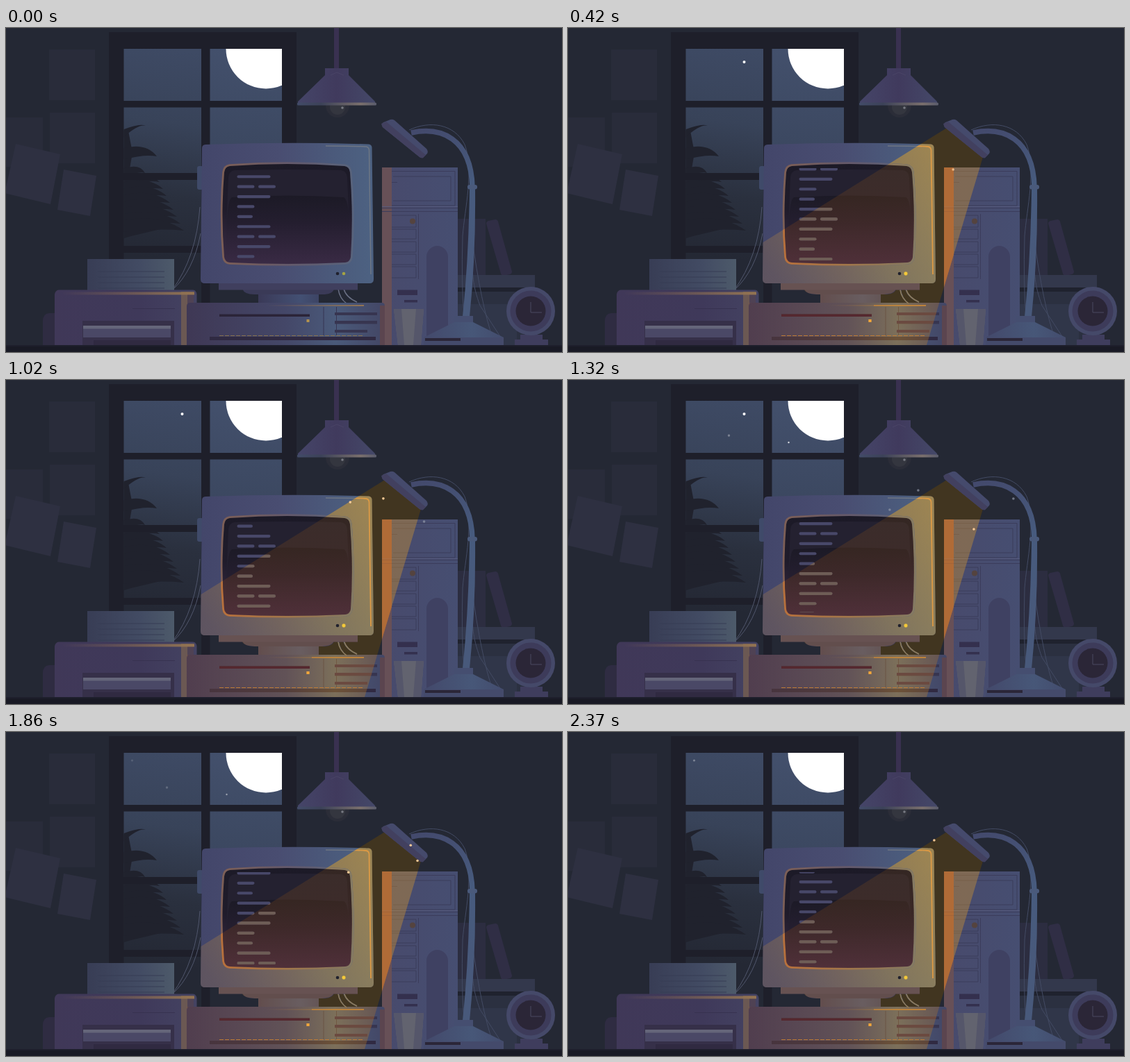
Write an HTML page that moves like this. It is 800 px wide and 467 px high and loops after 2.4 s.

```html
<!DOCTYPE html>
<html lang="en">
<head>
<meta charset="utf-8">
<title>Night desk</title>
<style>
html, body { margin: 0; width: 100%; height: 100%; overflow: hidden; background: #242834; }
svg { display: block; width: 100%; height: 100%; }
</style>
</head>
<body>
<svg viewBox="0 0 800 467" xmlns="http://www.w3.org/2000/svg">
<defs>
  <linearGradient id="sky" gradientUnits="userSpaceOnUse" x1="240" y1="30" x2="200" y2="330"><stop stop-color="#3e4a64"/><stop offset=".35" stop-color="#384359"/><stop offset=".7" stop-color="#2a303e"/><stop offset="1" stop-color="#242834"/></linearGradient>
  <linearGradient id="skyR" gradientUnits="userSpaceOnUse" x1="340" y1="30" x2="320" y2="200"><stop stop-color="#43506c"/><stop offset="1" stop-color="#3a465e"/></linearGradient>
  <linearGradient id="shade"><stop stop-color="#454568"/><stop offset=".5" stop-color="#403a5d"/><stop offset="1" stop-color="#444868"/></linearGradient>
  <linearGradient id="rim"><stop stop-color="#424b68"/><stop offset=".3" stop-color="#3c4258"/><stop offset=".8" stop-color="#7b706d"/><stop offset="1" stop-color="#5a5c6c"/></linearGradient>
  <linearGradient id="case"><stop stop-color="#43466a"/><stop offset=".45" stop-color="#494d71"/><stop offset=".8" stop-color="#4b5b7c"/><stop offset="1" stop-color="#4d6282"/></linearGradient>
  <linearGradient id="bezel"><stop stop-color="#7d5f56"/><stop offset=".5" stop-color="#64596a"/><stop offset="1" stop-color="#58637c"/></linearGradient>
  <linearGradient id="litBezel"><stop stop-color="#b8713c"/><stop offset=".5" stop-color="#a0764a"/><stop offset="1" stop-color="#857a62"/></linearGradient>
  <linearGradient id="glass" x2="0" y2="1"><stop stop-color="#1c1a27"/><stop offset=".45" stop-color="#1f1b2a"/><stop offset="1" stop-color="#3a2b45"/></linearGradient>
  <linearGradient id="glare" x2="0" y2="1"><stop stop-color="#1c1a26"/><stop offset=".4" stop-color="#241e2f"/><stop offset="1" stop-color="#392a44"/></linearGradient>
  <linearGradient id="litGlass" x2="0" y2="1"><stop stop-color="#a06010" stop-opacity=".18"/><stop offset="1" stop-color="#904018" stop-opacity=".25"/></linearGradient>
  <linearGradient id="unit"><stop stop-color="#3f3855"/><stop offset=".5" stop-color="#444768"/><stop offset=".75" stop-color="#4a5a7a"/><stop offset="1" stop-color="#434665"/></linearGradient>
  <linearGradient id="neck"><stop stop-color="#3a3957"/><stop offset=".7" stop-color="#435073"/><stop offset="1" stop-color="#3d4464"/></linearGradient>
  <linearGradient id="print"><stop stop-color="#403858"/><stop offset=".6" stop-color="#3f395a"/><stop offset="1" stop-color="#444362"/></linearGradient>
  <linearGradient id="paper"><stop stop-color="#383d55"/><stop offset=".6" stop-color="#424b63"/><stop offset="1" stop-color="#4d5a6a"/></linearGradient>
  <linearGradient id="gold"><stop stop-color="#8a6a52" stop-opacity="0"/><stop offset="1" stop-color="#937452"/></linearGradient>
  <linearGradient id="tower"><stop stop-color="#484a6c"/><stop offset="1" stop-color="#464e71"/></linearGradient>
  <linearGradient id="pole" gradientUnits="userSpaceOnUse" x1="600" y1="140" x2="680" y2="330"><stop stop-color="#43496c"/><stop offset=".5" stop-color="#475b7e"/><stop offset="1" stop-color="#48597b"/></linearGradient>
  <linearGradient id="cone"><stop stop-color="#43496b"/><stop offset=".6" stop-color="#475778"/><stop offset="1" stop-color="#434c6d"/></linearGradient>
  <linearGradient id="litCase" gradientUnits="userSpaceOnUse" x1="525" y1="180" x2="290" y2="350"><stop stop-color="#dca12e" stop-opacity=".56"/><stop offset=".5" stop-color="#cc9a34" stop-opacity=".42"/><stop offset="1" stop-color="#b48040" stop-opacity=".24"/></linearGradient>
  <linearGradient id="litUnit"><stop stop-color="#a05830" stop-opacity=".18"/><stop offset=".5" stop-color="#b07028" stop-opacity=".27"/><stop offset=".75" stop-color="#c8902a" stop-opacity=".4"/><stop offset="1" stop-color="#a86a28" stop-opacity=".32"/></linearGradient>
  <path id="mon" d="M287 168Q405 164 522 167.500Q526 168 526.500 172L529 362Q529 368 523 368L286 368Q280 368 280 362L282 173Q282 168.500 287 168Z"/>
  <path id="crt" d="M322 199Q405 193 487 199Q494 200 495 208Q500 270 496 330Q495 337 488 338Q405 342 322 338Q315 337 314 330Q309 270 314 208Q315 200 322 199Z"/>
  <clipPath id="beam"><path d="M545 144L279 310L255 330V457H516L597 186Z"/></clipPath>
  <clipPath id="view"><rect x="325" y="202" width="165" height="133"/></clipPath>
  <clipPath id="panes"><path d="M169.500 30H281V105H169.500ZM293.500 30H397V105H293.500ZM169.500 114.500H281V209H169.500ZM169.500 219H281V314H169.500Z"/></clipPath>
</defs>

<rect width="800" height="467" fill="#242834"/>
<g fill="#292c3a">
  <path d="M0 129H53V200H0ZM62 31H128V104H62ZM63 122H128V195H63Z"/>
  <path fill="#2e3041" d="M14 167L78 182L64 254L-2 238ZM83 204L130 213L121 271L74 262Z"/>
</g>

<!-- window -->
<rect x="148" y="6" width="270" height="390" fill="#1e1f2a"/>
<path fill="url(#sky)" d="M169.500 30H281V105H169.500ZM169.500 114.500H281V209H169.500ZM169.500 219H281V314H169.500ZM169.500 324H281V396H169.500ZM293.500 324H397V396H293.500Z"/>
<path fill="url(#skyR)" d="M293.500 30H397V105H293.500ZM293.500 114.500H397V209H293.500Z"/>
<g clip-path="url(#panes)">
  <circle cx="374" cy="30" r="57.500" fill="#fff"/>
  <g id="tree" fill="#20222d"><path d="M160 148H176L182 180L176 214L196 222L222 290L180 300L160 306Z"/></g>
</g>
<g id="stars" fill="#fff"></g>

<!-- ceiling lamp -->
<rect x="472" width="7" height="59" fill="#393150"/>
<circle cx="477" cy="112" r="17" fill="#2b2d38"/>
<circle cx="477" cy="114" r="11" fill="#34363f"/>
<circle cx="484" cy="115" r="1.800" fill="#777982"/>
<path fill="url(#shade)" d="M459 58H493V68L531 106V109H420V106L459 68Z"/>
<path fill="none" stroke="#4a4566" d="M467 68L476 64L486 68"/>
<rect x="419" y="107.500" width="114" height="4" rx="1.500" fill="url(#rim)"/>

<path class="lit" fill="#44371f" fill-opacity=".92" d="M545 144L450 203V457H516L597 186Z"/>

<!-- books and shelf -->
<path fill="#2c2d40" d="M650 275H690V356H650Z"/>
<path fill="#302e45" d="M691 282Q691 279 694 278L704 276Q707 276 708 279L728 351Q728 354 725 355L716 357Q713 357 712 354Z"/>
<path fill="#33384c" d="M650 356H761V374H650Z"/>
<path fill="#1f222e" d="M650 374H761V380H650Z"/>
<path fill="#2b3040" d="M650 380H745V457H650Z"/>
<path fill="#303649" d="M650 398H735V457H650Z"/>

<!-- clock -->
<path fill="#3f3d5d" d="M740 442H772V449H780V457H732V449H740Z"/>
<circle cx="755" cy="408" r="35" fill="#454969"/>
<circle cx="755" cy="408" r="29.500" fill="#3d3b5a"/>
<circle cx="755" cy="408" r="21.500" fill="#2b2637"/>
<path fill="none" stroke="#4b4861" d="M755 395V410H771"/>

<!-- printer -->
<g fill="none" stroke="#50566c"><path d="M279 258Q274 330 239 378M280 296Q270 350 239 378"/></g>
<path fill="#2f2c42" d="M70 411H62Q53 412 53 422V457H70Z"/>
<rect x="117" y="333" width="125" height="46" fill="url(#paper)"/>
<path stroke="#363d55" d="M132 351H228M132 359H228M132 367H228M132 375H228"/>
<path fill="url(#print)" d="M76 377.500H269Q274 378 274.500 384V457H70V384Q71 378 76 377.500Z"/>
<path fill="#79614f" fill-opacity=".75" d="M252 380H270V457H252Z"/>
<path fill="#4f4254" d="M261 384H270V457H261Z"/>
<rect x="80" y="380.500" width="191" height="4" fill="url(#gold)"/>
<path stroke="#373250" d="M182 404.500H243"/>
<path fill="#363049" d="M110 422H242V457H110Z"/>
<path fill="#4a4866" d="M111 433H237V446H111Z"/>
<path fill="#65667a" d="M111 429H237V433.500H111Z"/>
<path fill="#302a41" d="M126 450H237V457H126Z"/>

<!-- tower -->
<rect x="541" y="201" width="109" height="256" fill="url(#tower)"/>
<rect x="541" y="201" width="14" height="256" fill="#74534f" fill-opacity=".72"/>
<g fill="none" stroke="#3b3c5b">
  <path d="M555 206.500H646V256H555M557 214H640V249H557M555 222.500H563M541 259.500H650M541 264.500H650M593.500 268V362"/>
  <path d="M555 270H590V287H555M555 290H590V304H555M555 308H590V323H555M555 326H590V341H555M555 344H590V360H555"/>
</g>
<path stroke="#565a7c" d="M541 257.500H650"/>
<path fill="#3f4162" d="M605 457V330A15.500 16 0 0 1 636 330V457Z"/>
<path fill="#34304e" d="M563 377.500H592V385H563ZM573 392H592V395.500H573Z"/>
<circle cx="585" cy="278.500" r="4" fill="#54433f"/>

<!-- computer -->
<rect x="275" y="199" width="9" height="34" rx="3" fill="#3f4a69"/>
<path fill="none" stroke="#696f83" stroke-width="1.500" d="M478 376Q480 390 490 397M486 376Q489 388 505 395"/>
<path fill="url(#neck)" d="M363 382H450V397H363Z"/>
<path fill="#3a3a57" d="M340 376H472Q470 384 455 384H357Q343 384 340 376Z"/>
<path fill="#403f5e" d="M306 367H506V377.500H306Z"/>
<path fill="url(#unit)" d="M265 396H541Q545 396 545 401V457H260V401Q260 396 265 396Z"/>
<path fill="#5b454f" d="M538 400H545V457H538Z"/>
<path fill="none" stroke="#373552" d="M457 402V443M475.500 402V443"/>
<path fill="#2b2438" d="M307 412.500H437V416H307Z"/>
<path fill="#373550" d="M473 410H534V414H473ZM473 422H534V426.500H473ZM473 435H520V439H473Z"/>
<path fill="#302a42" d="M293 445H532V450H293Z"/>
<path stroke="#86704e" stroke-width="1.200" stroke-dasharray="6 2" d="M307 443.500H515"/>
<rect x="375" y="399" width="140" height="2" fill="url(#gold)"/>
<rect x="432.500" y="420" width="4" height="4" fill="#b3924f"/>
<g class="lit" clip-path="url(#beam)">
  <path fill="#b87a38" fill-opacity=".32" d="M306 368H506V377.500H471Q468 384 450 384V396H363V384Q343 384 340 377.500H306Z"/>
  <path fill="none" stroke="#8c7a5a" stroke-width="1.500" d="M478 378Q480 390 490 397M487 378Q490 388 505 395"/>
  <path fill="url(#litUnit)" d="M260 396H545V457H260Z"/>
  <path stroke="#bd7a34" stroke-width="1.200" stroke-dasharray="6 2" d="M307 443.500H515"/>
  <path stroke="#d58c35" stroke-width="1.500" stroke-opacity=".75" d="M440 400H515"/>
  <path stroke="#55282f" stroke-width="3.500" d="M307 414.200H437"/>
  <path stroke="#6b4a40" stroke-width="4" d="M473 412H534M473 424H534M473 437H520"/>
  <rect x="432.500" y="420" width="4" height="4" fill="#f0a53c"/>
  <rect x="541" y="201" width="109" height="256" fill="#d89a2e" fill-opacity=".38"/>
  <rect x="541" y="201" width="14" height="256" fill="#d06a28" fill-opacity=".5"/>
</g>

<!-- monitor -->
<use href="#mon" fill="url(#case)"/>
<g class="lit" clip-path="url(#beam)"><use href="#mon" fill="url(#litCase)"/></g>
<path id="edge" fill="none" stroke="#7d8086" stroke-opacity=".7" stroke-width="1.500" d="M460 170Q500 170 518 171Q522 171.500 522.500 176L525 355"/>
<use href="#crt" fill="none" stroke="url(#bezel)" stroke-width="5.500"/>
<g class="lit" clip-path="url(#beam)">
  <path fill="none" stroke="#de9a42" stroke-width="1.800" d="M490 170Q505 170 518 171Q522 171.500 522.500 176L525 355"/>
  <use href="#crt" fill="none" stroke="url(#litBezel)" stroke-width="5.500"/>
  <circle cx="486" cy="354" r="3" fill="#f5c93a" fill-opacity=".3"/>
</g>
<use href="#crt" fill="url(#glass)"/>
<path fill="#242130" d="M329 205Q405 203 482 205Q490 206 491 215L494 285H317L320 215Q321 206 329 205Z"/>
<path fill="url(#glare)" d="M317 300Q318 247 325 244Q405 239 486 244Q494 247 495 300V330Q494 336 488 337Q405 341 322 337Q316 336 315 330Z"/>
<g clip-path="url(#view)" stroke="#484869"><g id="code" stroke-width="4.200" stroke-linecap="round"></g></g>
<g class="lit" clip-path="url(#beam)">
  <use href="#crt" fill="url(#litGlass)"/>
  <g clip-path="url(#view)"><use href="#code" stroke="#6e5d56"/></g>
</g>
<circle cx="477" cy="354" r="2.300" fill="#20212d"/>
<circle cx="486" cy="354" r="2.300" fill="#a5a443"/>
<circle class="lit" cx="486" cy="354" r="2.400" fill="#f5c93a"/>

<!-- glass -->
<path fill="#62636f" d="M558 405H601L597 457H564Z"/>
<path fill="#55566a" d="M558 405H569L573 457H564ZM590 405H601L597 457H586Z"/>

<!-- desk lamp -->
<path fill="none" stroke="#434b64" d="M580 147C610 133 645 138 660 168C674 205 660 260 657 300Q655 370 659 415M672 235C680 330 660 340 682 400T712 446M670 300Q684 400 700 446"/>
<path fill="none" stroke="url(#pole)" stroke-width="7.500" d="M583 151C625 142 669 158 671 229"/>
<path fill="url(#pole)" d="M667 229H675Q676 330 667 416H657Q666 330 667 229Z"/>
<rect x="664" y="226" width="14" height="6.500" rx="3" fill="#4a5a7b"/>
<path fill="#454e70" d="M645 415H672V425H645Z"/>
<path fill="url(#cone)" d="M645 424H672L716 446H601Z"/>
<path fill="#444a6b" d="M601 446H716V457H601Z"/>
<path fill="#2b2638" d="M603 447H654V451H603Z"/>
<path fill="#454a6c" d="M543 136L553 132Q556 131 559 133L605 174Q608 178 606 181L600 187Q598 188 595 186L542 143Q539 139 543 136Z"/>
<path fill="#42405f" d="M540 138L547 135L604 183L600 187Q598 188 595 186L542 143Z"/>

<rect y="457" width="800" height="10" fill="#191a25"/>
<rect y="457" width="800" height="2" fill="#1e1f2c"/>
<g id="dust"></g>
</svg>
<script>
const NS = "http://www.w3.org/2000/svg";
const LOOP = 2400;
const byId = id => document.getElementById(id);
const clamp = v => Math.max(0, Math.min(1, v));

function add(parent, tag, attrs) {
  const el = document.createElementNS(NS, tag);
  for (const k in attrs) el.setAttribute(k, attrs[k]);
  return parent.appendChild(el);
}

// A drooping leaf from the trunk to its tip.
function frond(y0, x, y) {
  const mid = (x + 166) / 2;
  add(byId("tree"), "path", { d: `M160 ${y0}Q${mid + 8} ${y0 - 14} ${x} ${y}Q${mid + 6} ${y - 4} 160 ${y0 + 16}Z` });
}
frond(150, 201, 141);
frond(176, 217, 185);
frond(206, 200, 209);
for (let i = 0; i < 8; i++) frond(216 + i * 9, 221 + i * 5, 222 + i * 10);

// Code lines: five kinds, repeated; the list rises by five rows each half loop.
const ROW = 14.4;
const kinds = [[48], [25, 25], [48], [25], [22.5]];
for (let i = -1; i < 15; i++) {
  let x = 332.5;
  for (const w of kinds[(i + 5) % 5]) {
    const y = 214.3 + i * ROW;
    add(byId("code"), "path", { d: `M${x + 2.1} ${y}H${x + w - 2.1}` });
    x += w + 5.5;
  }
}

// Stars twinkle from one time to another.
const stars = [
  { cx: 253.5, cy: 49, r: 2, peak: 1, from: 200, to: 1560 },
  { cx: 231.5, cy: 80, r: 1.7, peak: .32, from: 1050, to: 1950 },
  { cx: 317.5, cy: 90, r: 1.2, peak: .8, from: 1050, to: 1950 },
  { cx: 181.5, cy: 41, r: 1.6, peak: .32, from: 1800, to: 2700 }
].map(s => ({ ...s, el: add(byId("stars"), "circle", { cx: s.cx, cy: s.cy, r: s.r }) }));

// Dust drifts from [time, x, y] to [time, x, y] and fades just outside that span.
const FADE = 120;
const dust = [
  [[240, 570, 230], [400, 556, 207]],
  [[180, 480, 170], [300, 464, 166]],
  [[690, 531, 164], [1320, 463, 187]],
  [[690, 586, 184], [1320, 504, 159]],
  [[690, 621, 192], [1320, 584, 215]],
  [[1500, 558, 194], [1740, 522, 166]],
  [[1620, 520, 206], [2070, 469, 199]],
  [[1320, 641, 171], [2370, 527, 156]],
  [[1620, 614, 193], [2070, 573, 179]]
].map(([a, b]) => ({ a, b, el: add(byId("dust"), "circle", { r: 1.8 }) }));

const inBeam = (x, y) => y > 144 + (545 - x) * .623 && x < 597 - (y - 186) * .3;

function draw(t) {
  const on = t % (LOOP / 2) >= 60;
  for (const el of document.querySelectorAll(".lit")) el.setAttribute("display", on ? "inline" : "none");

  const rise = 5 * ROW * (t * 2 / LOOP % 1);
  byId("code").setAttribute("transform", `translate(0 ${-rise})`);

  for (const { el, peak, from, to } of stars) {
    const u = clamp((t - from) / (to - from));
    el.setAttribute("opacity", peak * clamp(2 * Math.sin(Math.PI * u)));
  }

  for (const { el, a, b } of dust) {
    const u = (t - a[0]) / (b[0] - a[0]);
    const x = a[1] + (b[1] - a[1]) * u, y = a[2] + (b[2] - a[2]) * u;
    const out = Math.max(a[0] - t, t - b[0], 0);
    const warm = on && inBeam(x, y);
    el.setAttribute("cx", x);
    el.setAttribute("cy", y);
    el.setAttribute("opacity", clamp(1 - out / FADE) * (warm ? .95 : .7));
    el.setAttribute("fill", warm ? "#ffd09a" : "#9298a8");
  }
}

const start = performance.now();
function tick() {
  draw((performance.now() - start) % LOOP);
  requestAnimationFrame(tick);
}
draw(0);
requestAnimationFrame(tick);
</script>
</body>
</html>
```
